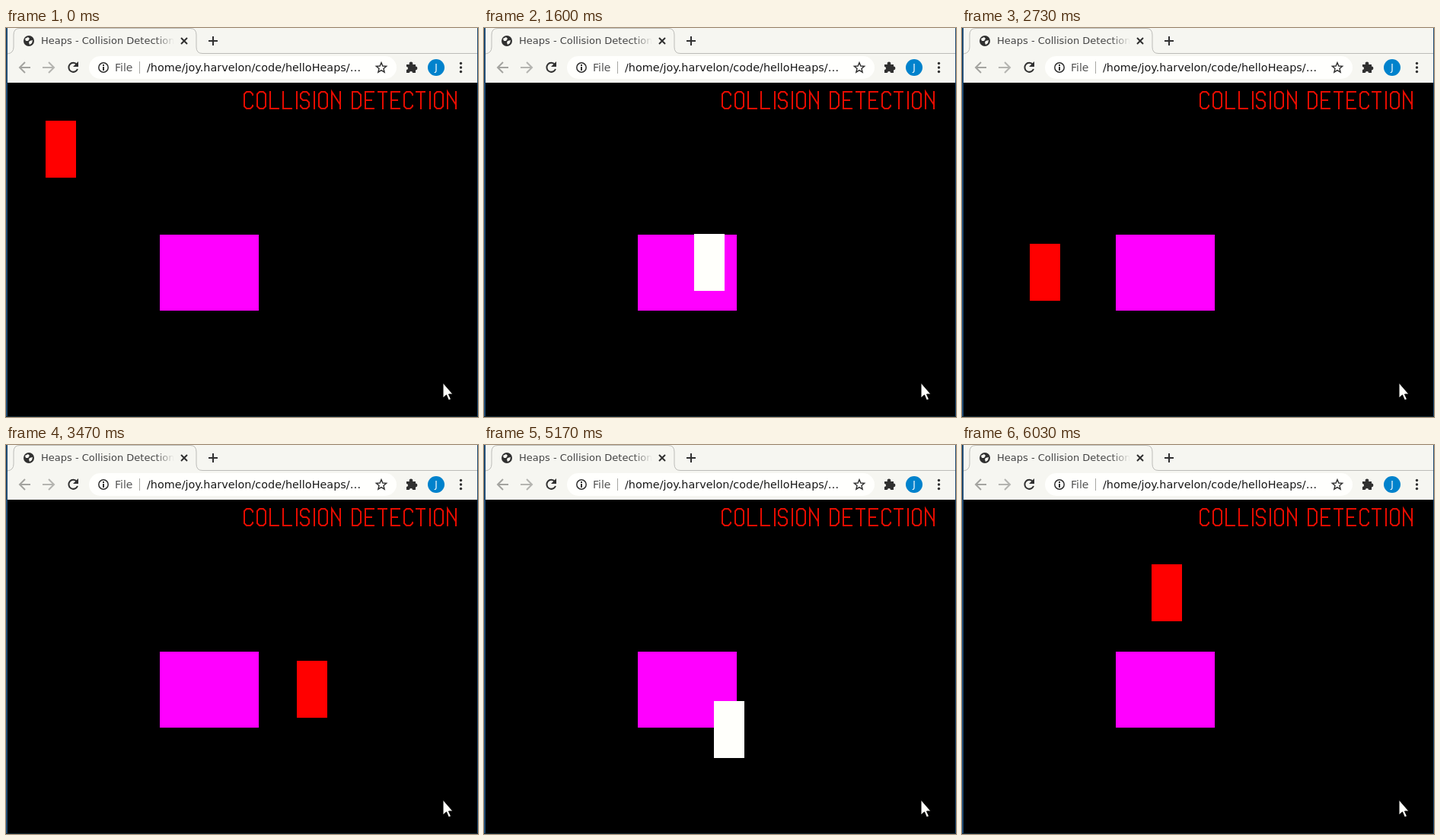
These frames come from a looping animation (620x512 px, 7110 ms). An HTML page with a canvas:

```html
<!DOCTYPE html>
<html lang="en">
<head>
<meta charset="utf-8">
<title>Heaps - Collision Detection</title>
<style>
html, body { margin: 0; width: 100%; height: 100%; overflow: hidden; background: #000; }
canvas { display: block; }
</style>
</head>
<body>
<canvas id="stage" width="620" height="512" aria-label="COLLISION DETECTION"></canvas>
<script>
const ctx = document.getElementById('stage').getContext('2d');
const LOOP = 7110, FPS = 30, SPEED = 0.4;
const INK = '#303030', BAR = '#f6f6f1', EDGE = '#1f4a72';
const FONT = '"DejaVu Sans", Verdana, sans-serif';
const BLOCK = { x: 202, y: 272, w: 130, h: 100 };
const START = { x: 52, y: 122, w: 40, h: 75 };

const DIRECTIONS = { left: [-1, 0], right: [1, 0], up: [0, -1], down: [0, 1] };

// Arrow keys with press and release times
const PRESSES = [
  ['down', 120, 510], ['right', 510, 1130],
  ['left', 1270, 1330], ['down', 1270, 1426], ['up', 1426, 1967],
  ['left', 1735, 2288], ['down', 2318, 2718], ['right', 2648, 3572],
  ['up', 3520, 3952], ['left', 3847, 4185], ['down', 3952, 4184],
  ['right', 4630, 4907], ['down', 4750, 5082], ['left', 4922, 5479],
  ['up', 5540, 5990], ['right', 5850, 6030]
];

function playerAt(t) {
  let { x, y, w, h } = START;
  for (const [key, from, to] of PRESSES) {
    const step = SPEED * Math.max(0, Math.min(t, to) - from);
    x += DIRECTIONS[key][0] * step;
    y += DIRECTIONS[key][1] * step;
  }
  return { x: Math.round(x), y: Math.round(y), w, h };
}

function overlaps(a, b) {
  return a.x < b.x + b.w && a.x + a.w > b.x && a.y < b.y + b.h && a.y + a.h > b.y;
}

function rect(color, x, y, w, h) {
  ctx.fillStyle = color;
  ctx.fillRect(x, y, w, h);
}

function box(color, b) {
  rect(color, b.x, b.y, b.w, b.h);
}

function disc(color, x, y, r) {
  ctx.fillStyle = color;
  ctx.beginPath();
  ctx.arc(x, y, r, 0, Math.PI * 2);
  ctx.fill();
}

function stroke(d, color = INK, width = 2) {
  ctx.strokeStyle = color;
  ctx.lineWidth = width;
  ctx.stroke(new Path2D(d));
}

function fill(d, color = INK) {
  ctx.fillStyle = color;
  ctx.fill(new Path2D(d));
}

function text(s, x, y, size, color, align = 'left') {
  ctx.font = `${size}px ${FONT}`;
  ctx.textAlign = align;
  ctx.fillStyle = color;
  ctx.fillText(s, x, y);
}

function starPath(cx, cy, outer, inner) {
  let d = '';
  for (let i = 0; i < 10; i++) {
    const a = i * Math.PI / 5 - Math.PI / 2, r = i % 2 ? inner : outer;
    d += `${i ? 'L' : 'M'}${cx + r * Math.cos(a)} ${cy + r * Math.sin(a)} `;
  }
  return d + 'Z';
}

function drawTab() {
  rect(BAR, 0, 0, 620, 72);
  stroke('M2 34 Q10 33 10 25 V9 Q10 .5 18 .5 H242 Q250 .5 250 9 V25 Q250 33.5 258 33.5 H620', '#bcbcb8', 1);

  disc(INK, 30, 17, 7);
  fill('M25 14 L29 12 L31 14 L29 17 H26 Z M31 17 L35 16 L34 20 L31 22 L30 19 Z', BAR);

  const fade = ctx.createLinearGradient(196, 0, 221, 0);
  fade.addColorStop(0, '#444');
  fade.addColorStop(1, '#4440');
  text('Heaps - Collision Detection', 46, 21, 13, fade);
  stroke('M230 13 L238 21 M238 13 L230 21');
  stroke('M266 17 H278 M272 11 V23');
}

function drawToolbar() {
  stroke('M32 52 H18 M25 45 L18 52 L25 59', '#a4a4a0');
  stroke('M48 52 H63 M56 45 L63 52 L56 59', '#b4b4b0');
  stroke('M93 48 A6 6 0 1 0 94 54');
  fill('M95 44 V51 H88 Z');

  ctx.fillStyle = '#fffffd';
  ctx.beginPath();
  ctx.roundRect(109, 37, 404, 30, 15);
  ctx.fill();
  stroke('M134.2 52 A6.2 6.2 0 1 0 121.8 52 A6.2 6.2 0 1 0 134.2 52', INK, 1.5);
  rect(INK, 127, 48, 2, 2);
  rect(INK, 127, 51, 2, 5);
  text('File', 143, 57, 14, '#555');
  rect('#a8a8a4', 175, 44, 1, 16);
  text('/home/joy.harvelon/code/helloHeaps/…', 185, 57, 14.4, '#181818');
  stroke(starPath(493, 52.5, 7, 3.1), INK, 1.4);

  rect(INK, 526, 48, 12, 11);
  disc(INK, 532, 47, 2.4);
  disc(INK, 538, 53, 2.4);
  disc(BAR, 526, 53, 2.1);
  disc(BAR, 532, 59, 2.1);

  disc('#0082cc', 565, 52, 11);
  text('J', 565, 56, 12, '#fff', 'center');
  for (let i = -1; i < 2; i++) disc(INK, 597.5, 52 + 5.5 * i, 1.7);
}

// Stroked letters on an 11 x 22 cell
const GLYPHS = {
  C: 'M11 5 V3 L8 0 H3 L0 3 V19 L3 22 H8 L11 19 V17',
  O: 'M3 0 H8 L11 3 V19 L8 22 H3 L0 19 V3 Z',
  L: 'M0 -1 V22 H12',
  I: 'M1 -1 V23',
  S: 'M11 5 V3 L8 0 H3 L0 3 V8 L3 11 H8 L11 14 V19 L8 22 H3 L0 19 V17',
  N: 'M0 23 V0 L11 17 M11 -1 V23',
  D: 'M0 0 H7 L11 4 V18 L7 22 H0 Z',
  E: 'M12 0 H0 V22 H12 M0 11 H9',
  T: 'M-1 0 H12 M6 0 V23'
};

function drawWord(word, x) {
  for (const c of word) {
    ctx.save();
    ctx.translate(Math.round(x) + 1, 84);
    stroke(GLYPHS[c], '#e60c00', 2);
    ctx.restore();
    x += c === 'I' ? 6.9 : 16.9;
  }
}

function drawCursor() {
  const arrow = 'M574 467 V487 L578.5 483 L581.5 490 L584.5 488.5 L581.5 482 H587 Z';
  fill(arrow, '#fffffb');
  stroke(arrow, '#000', 1);
}

function drawFrame(now) {
  const t = Math.floor((now % LOOP + 5) * FPS / 1000) * 1000 / FPS;
  const player = playerAt(t);
  rect('#000', 0, 0, 620, 512);
  drawTab();
  drawToolbar();
  box('#f0f', BLOCK);
  box(overlaps(player, BLOCK) ? '#fffffb' : '#f00', player);
  drawWord('COLLISION', 312);
  drawWord('DETECTION', 454);
  rect(EDGE, 0, 0, 2, 512);
  rect(EDGE, 619, 0, 1, 512);
  rect('#182c36', 0, 511, 620, 1);
  drawCursor();
}

let start;
function tick(now) {
  start ??= now;
  drawFrame(Math.max(0, now - start));
  requestAnimationFrame(tick);
}
drawFrame(0);
requestAnimationFrame(tick);
</script>
</body>
</html>
```
